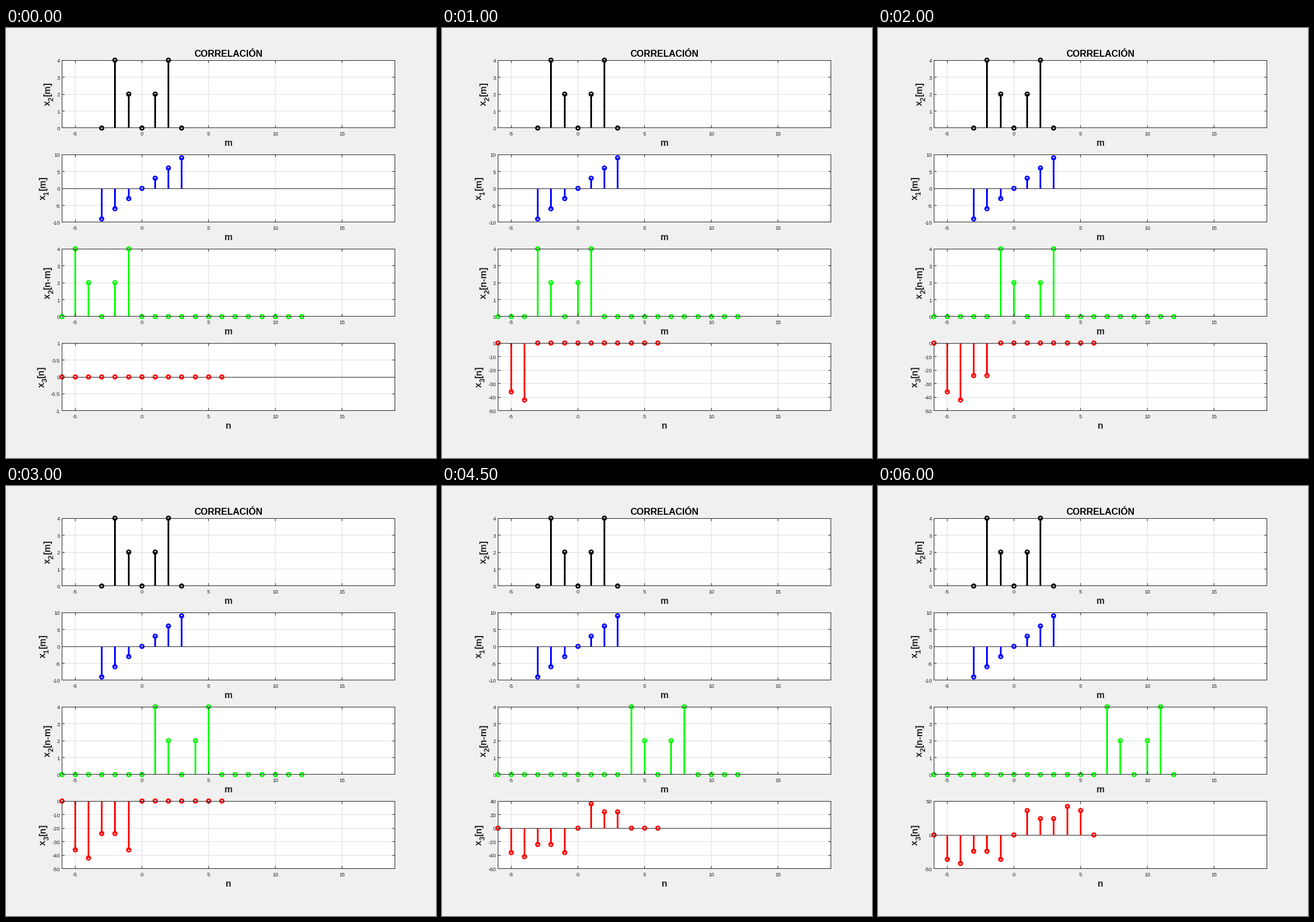
Animation of 748x748 px, one loop 6500 ms. Source, as a matplotlib script:

```python
import math

import numpy as np
import matplotlib.pyplot as plt
from matplotlib.animation import FuncAnimation
from matplotlib.patches import Circle, Rectangle

SIZE = 748
FRAMES = 13
INK = "#262626"
GRID = "#dedede"

# Panel geometry in whole pixels, y pointing down
LEFT, WIDTH = 97, 580
TOP, HEIGHT, PITCH = 56, 118, 164
X_MIN, X_MAX = -6, 19
TICK = 4.5
TICK_FONT, LABEL_FONT, SUB_FONT = 9.33, 16, 12.8

# Glyph advances in em: regular and bold agree for these characters
ADVANCE = {"-": 0.333, ".": 0.278, "[": 0.333, "]": 0.333, "m": 0.889, "n": 0.611}

# Signals
m = np.arange(-3, 4)
x1 = 3 * m
x2 = np.array([0, 4, 2, 0, 2, 4, 0])
m_long = np.arange(-6, 13)
n = np.arange(-6, 7)
x3 = np.convolve(x1, x2)

plt.rcParams["font.family"] = "Liberation Sans"
plt.rcParams["path.snap"] = False

fig = plt.figure(figsize=(SIZE / 72, SIZE / 72), dpi=72, facecolor="#f0f0f0")
ax = fig.add_axes([0, 0, 1, 1])


def crisp(v, end):
    """Centre of the pixel that holds v, kept inside a box that stops at end."""
    return min(math.floor(v), end - 1) + 0.5


def advance(text, size):
    return size * sum(ADVANCE.get(c, 0.556) for c in text)


def x_pos(v):
    return LEFT + (v - X_MIN) * WIDTH / (X_MAX - X_MIN)


def line(xs, ys, color=INK, width=1, z=1):
    ax.plot(xs, ys, color=color, lw=width, solid_capstyle="butt", zorder=z)


def label(x, y, text, size=TICK_FONT, ha="center", color=INK, weight="normal", turn=0):
    ax.text(x, y, text, fontsize=size, ha=ha, va="baseline", color=color,
            weight=weight, rotation=turn, rotation_mode="anchor", zorder=6)


def y_title(x, mid, sub, arg):
    """Upright bold 'x_sub[arg]' centred on mid, with its baseline at x."""
    parts = [("x", LABEL_FONT, 0), (sub, SUB_FONT, 5.5), (arg, LABEL_FONT, 0)]
    y = mid + sum(advance(t, s) for t, s, _ in parts) / 2
    for text, size, drop in parts:
        label(x + drop, y, text, size, "left", weight="bold", turn=90)
        y -= advance(text, size)


def panel(row, xs, ys, color, y_ticks, sub, arg, x_name):
    top = TOP + row * PITCH
    bottom, right = top + HEIGHT, LEFT + WIDTH
    lo, hi = y_ticks[0], y_ticks[-1]

    def y_pos(v):
        return bottom - (v - lo) * HEIGHT / (hi - lo)

    l, r, t, b = LEFT + 0.5, right - 0.5, top + 0.5, bottom - 0.5
    ax.add_patch(Rectangle((LEFT, top), WIDTH, HEIGHT, fc="white", ec="none", zorder=0))

    for v in range(-5, 16, 5):
        x = crisp(x_pos(v), right)
        line([x, x], [t, b], GRID)
        line([x, x], [t, t + TICK], z=5)
        line([x, x], [b, b - TICK], z=5)
        label(x_pos(v), bottom + 13, f"{v}")

    text_edge = LEFT - 3
    names = [f"{v:g}" for v in y_ticks]
    for v, name in zip(y_ticks, names):
        y = crisp(y_pos(v), bottom)
        line([l, r], [y, y], GRID)
        line([l, l + TICK], [y, y], z=5)
        line([r, r - TICK], [y, y], z=5)
        label(text_edge, y_pos(v) + 4, name, ha="right")

    # Zero line and stems
    zero = crisp(y_pos(0), bottom)
    line([l, r], [zero, zero], z=2)
    for xv, yv in zip(xs, ys):
        x, y = crisp(x_pos(xv), right), y_pos(yv)
        if yv:
            line([x, x], [zero, y], color, 3, z=3)
        ax.add_patch(Circle((x, y), 3.15, fill=False, ec=color, lw=2.67, zorder=4))

    ax.add_patch(Rectangle((l, t), r - l, b - t, fill=False, ec=INK, lw=1, zorder=5))
    label(LEFT + WIDTH / 2, bottom + 31, x_name, LABEL_FONT, weight="bold")
    widest = max(advance(name, TICK_FONT) for name in names)
    y_title(text_edge - widest - 11.5, (top + bottom) / 2, sub, arg)


def result_ticks(step):
    """Scale of the result panel, widened as values come in."""
    if step == 0:
        return np.linspace(-1, 1, 5)
    if step == 1:
        return np.arange(-40, 1, 10)
    if step < 7:
        return np.arange(-50, 1, 10)
    if step < 10:
        return np.arange(-60, 41, 20)
    return np.array([-50, 0, 50])


def draw(step):
    ax.clear()
    ax.set_xlim(0, SIZE)
    ax.set_ylim(SIZE, 0)
    ax.axis("off")

    shifted = np.zeros(len(m_long), int)
    shifted[step:step + len(x2)] = x2
    partial = np.where(np.arange(len(n)) <= step, x3, 0)

    label(LEFT + WIDTH / 2, 50, "CORRELACIÓN", LABEL_FONT, color="black", weight="bold")
    panel(0, m, x2, "#000000", range(5), "2", "[m]", "m")
    panel(1, m, x1, "#0000ff", range(-10, 11, 5), "1", "[m]", "m")
    panel(2, m_long, shifted, "#00ff00", range(5), "2", "[n-m]", "m")
    panel(3, n, partial, "#ff0000", result_ticks(step), "3", "[n]", "n")
    return []


anim = FuncAnimation(fig, draw, frames=FRAMES, interval=500, repeat=True,
                     repeat_delay=0, blit=False)
plt.show()
```
